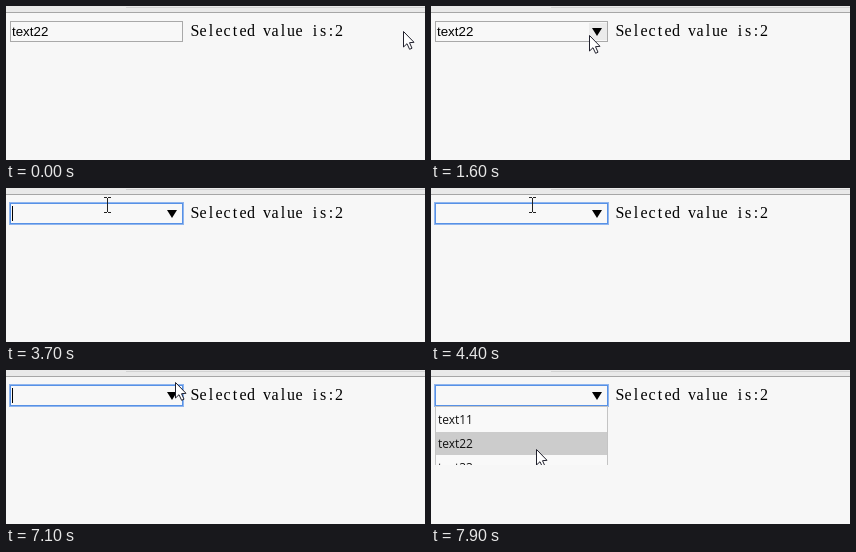
Recreate the animation shown at these times as an HTML page with a canvas. Size 419 by 154 pixels, loop 8 s.

```html
<!DOCTYPE html>
<html lang="en">
<head>
<meta charset="utf-8">
<title>Combo box</title>
<style>
html, body { margin: 0; width: 100%; height: 100%; overflow: hidden; background: #f7f7f7; }
canvas { display: block; }
</style>
</head>
<body>
<canvas id="stage" width="419" height="154"></canvas>
<script>
const LOOP = 8000;
const ctx = document.getElementById('stage').getContext('2d');
const ITEMS = ['text11', 'text22', 'text33'];
const INPUT_FONT = '13.333px "Liberation Sans", Arial, sans-serif';
const LIST_FONT = '12px "Open Sans", sans-serif';
const LABEL_FONT = '16px "Liberation Serif", serif';

// Pointer: time, x, y, shape
const POINTER = [
  [0, 397, 25, 'arrow'], [100, 237, 10, 'arrow'],
  [300, 208, 12, 'arrow'], [400, 182, 14, 'arrow'], [500, 139, 19, 'beam'],
  [600, 110, 21, 'beam'], [700, 108, 23, 'beam'], [800, 109, 25, 'beam'],
  [1200, 113, 25, 'beam'], [1300, 122, 26, 'beam'], [1400, 135, 27, 'beam'],
  [1500, 152, 28, 'arrow'], [1600, 158, 29, 'arrow'], [1700, 158, 27, 'arrow'],
  [2200, 150, 25, 'arrow'], [2300, 124, 20, 'beam'], [2400, 102, 17, 'beam'],
  [2600, 101, 17, 'beam'],
  [6600, 108, 16, 'beam'], [6700, 128, 8, 'arrow'], [6800, 145, 3, 'arrow'],
  [6900, 158, 2, 'arrow'], [7000, 167, 6, 'arrow'], [7100, 169, 12, 'arrow'],
  [7200, 168, 17, 'arrow'], [7300, 166, 19, 'arrow'], [7400, 166, 20, 'arrow'],
  [7700, 150, 40, 'arrow'], [7800, 120, 65, 'arrow'], [7900, 105, 79, 'arrow']
];
const VALUE = [[0, 'text22'], [3700, ''], [3900, 't'], [4300, ''], [4800, '1'], [5600, '']];
const CARET = [[0, false], [2300, true], [2800, false], [3700, true], [4400, false],
  [4800, true], [5300, false], [5600, true], [6100, false], [6600, true], [7200, false]];
const LIST = [[0, []], [3900, ITEMS], [4400, []], [4800, ['text11']], [5600, []], [7500, ITEMS]];
const HOVER = [[0, -1], [7700, 0], [7800, 1]];

const entryAt = (track, t) => track.findLast(e => e[0] <= t);
const valueAt = (track, t) => entryAt(track, t)[1];
const between = (t, a, b) => t >= a && t < b;

function rect(color, x, y, w, h) {
  ctx.fillStyle = color;
  ctx.fillRect(x, y, w, h);
}

function frame(color, x, y, w, h) {
  ctx.strokeStyle = color;
  ctx.lineWidth = 1;
  ctx.strokeRect(x + 0.5, y + 0.5, w - 1, h - 1);
}

function text(str, x, y, font, color) {
  ctx.font = font;
  ctx.fillStyle = color;
  ctx.textAlign = 'left';
  ctx.fillText(str, x, y);
}

function polygon(points, fill, stroke) {
  ctx.beginPath();
  points.forEach(([x, y]) => ctx.lineTo(x, y));
  ctx.closePath();
  ctx.fillStyle = fill;
  ctx.fill();
  if (stroke) {
    ctx.strokeStyle = stroke;
    ctx.lineWidth = 1;
    ctx.stroke();
  }
}

function drawPage() {
  rect('#f7f7f7', 0, 0, 419, 154);
  rect('#e9e9e9', 0, 0, 419, 6);
  rect('#d2d2d2', 120, 1, 299, 1);
  rect('#a6a6a6', 0, 6, 419, 1);
  // Fixed-pitch label: each letter centred in an 8px cell
  ctx.font = LABEL_FONT;
  ctx.fillStyle = '#000';
  ctx.textAlign = 'center';
  [...'Selected value is:2'].forEach((c, i) => ctx.fillText(c, 189 + i * 8, 30));
}

function drawInput(t) {
  const focused = t >= 1900;
  const value = valueAt(VALUE, t);
  const selected = between(t, 2800, 3700);
  rect('#f8f8f8', 4, 15, 173, 21);
  if (focused) {
    frame('#8fb5ee', 3, 14, 175, 23);
    frame('#5791e6', 4, 15, 173, 21);
  } else {
    frame('#a9a9a9', 4, 15, 173, 21);
  }
  if (between(t, 1500, 2300)) rect('#ebebeb', 158, 17, 18, 17);
  if (t >= 500) polygon([[161, 22], [171, 22], [166, 30]], '#000');
  if (selected) rect('#3390ff', 6, 18, 36, 15);
  text(value, 6, 30, INPUT_FONT, selected ? '#fff' : '#000');
  const end = 6 + Math.floor(ctx.measureText(value).width);
  if (focused && value === 'text22' && !selected) drawSquiggle(6, end, 32);
  if (valueAt(CARET, t)) rect('#000', end, 18, 1, 15);
}

function drawSquiggle(from, to, y) {
  ctx.beginPath();
  for (let x = from; x <= to; x += 2) ctx.lineTo(x, y + (x / 2 % 2 ? 1.5 : 0));
  ctx.strokeStyle = '#f03030';
  ctx.lineWidth = 1;
  ctx.stroke();
}

function drawList(t) {
  const items = valueAt(LIST, t);
  if (!items.length) return;
  const height = items.length * 24 + 2;
  ctx.save();
  ctx.beginPath();
  ctx.rect(4, 36, 173, 59);
  ctx.clip();
  rect('#f9f9f9', 4, 36, 173, height);
  frame('#c4c4c4', 4, 36, 173, height);
  items.forEach((item, i) => {
    const top = 38 + i * 24;
    if (i === valueAt(HOVER, t)) rect('#cccccc', 5, top, 171, 23);
    text(item, 7, top + 16, LIST_FONT, '#111');
  });
  ctx.restore();
}

function drawPointer(t) {
  const [, x, y, shape] = entryAt(POINTER, t);
  ctx.save();
  if (t >= 7500) {
    ctx.beginPath();
    ctx.rect(0, 0, 419, 95);
    ctx.clip();
  }
  ctx.translate(x, y);
  if (shape === 'arrow') {
    polygon([[0.5, 0.5], [0.5, 16], [4, 12.7], [6.6, 18.3], [9, 17.2],
      [6.5, 11.7], [11, 11.3]], '#fff', '#20202c');
  } else {
    rect('#222', 0, -7, 1, 14);
    for (const edge of [-8, 7]) {
      rect('#222', -3, edge, 3, 1);
      rect('#222', 1, edge, 3, 1);
    }
  }
  ctx.restore();
}

function draw(now) {
  const t = now % LOOP;
  drawPage();
  drawInput(t);
  drawList(t);
  drawPointer(t);
  requestAnimationFrame(draw);
}
requestAnimationFrame(draw);
</script>
</body>
</html>
```
